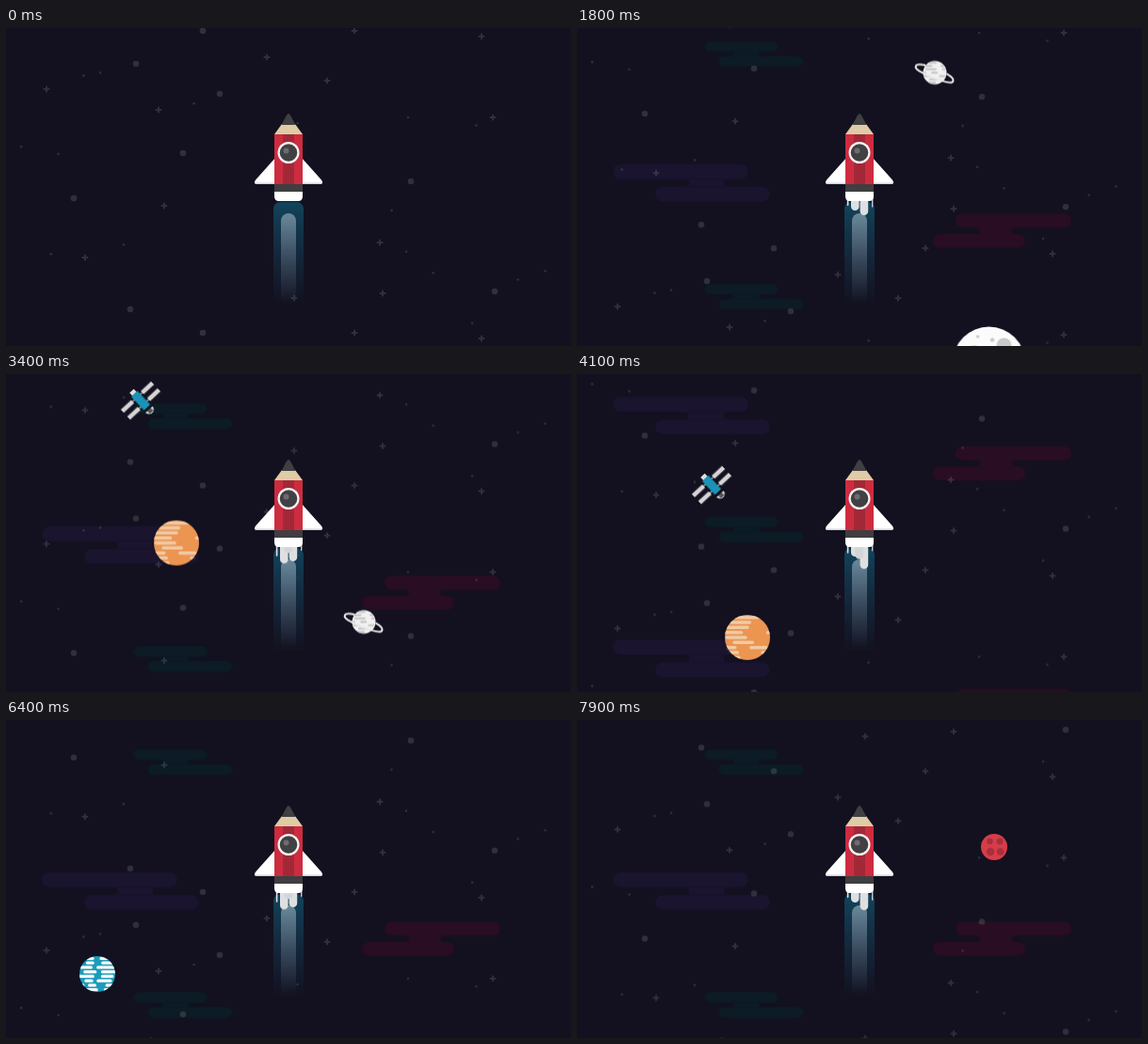
An HTML page that plays this animation: 600 px wide and 338 px high, repeating every 8 s.

```html
<!DOCTYPE html>
<html lang="en">
<head>
<meta charset="utf-8">
<title>Pencil rocket</title>
<style>
  html, body { margin: 0; width: 100%; height: 100%; overflow: hidden; background: #13111f; }
  svg { display: block; width: 100vw; height: 100vh; }

  /* Everything moves in 100 ms ticks over an 8 s loop; speeds are per second. */
  .fall { --x: 0px; --start: 0px; animation: fall 8s steps(80) infinite; }
  #clouds { --speed: 172px; }
  #stars { --speed: 128.4px; }
  #moon { --x: 437.5px; --start: -40px; --speed: 220px; }
  #ringed { --x: 380px; --start: -195.5px; --speed: 135px; }
  #orange { --x: 181px; --start: -308.7px; --speed: 143.6px; }
  #blue { --x: 97px; --start: -573.5px; --speed: 131.8px; }
  #red { --x: 443px; --start: -892px; --speed: 130px; }
  #satellite { animation: descend 8s steps(60) infinite; }
  #exhaust { animation: ignite 8s step-end infinite; }

  @keyframes fall {
    from { transform: translate(var(--x), var(--start)); }
    to { transform: translate(var(--x), calc(var(--start) + 8 * var(--speed))); }
  }
  /* Comes to rest with one panel tip at the lower edge. */
  @keyframes descend {
    0% { transform: translate(143px, -408px); }
    74.99% { transform: translate(143px, 361.8px); }
    75%, 100% { transform: translate(143px, 358px); }
  }
  @keyframes ignite {
    0% { visibility: hidden; }
    1.25%, 100% { visibility: visible; }
  }
</style>
</head>
<body>
<svg viewBox="0 0 600 338" preserveAspectRatio="none">
  <defs>
    <linearGradient id="outerFlame" x1="0" y1="0" x2="0" y2="1">
      <stop offset="0" stop-color="#12455d"/>
      <stop offset=".45" stop-color="#143a52" stop-opacity=".6"/>
      <stop offset=".95" stop-color="#143650" stop-opacity="0"/>
    </linearGradient>
    <linearGradient id="innerFlame" x1="0" y1="0" x2="0" y2="1">
      <stop offset="0" stop-color="#c3d3df" stop-opacity=".5"/>
      <stop offset=".5" stop-color="#b4c2d2" stop-opacity=".22"/>
      <stop offset=".95" stop-color="#aebfd0" stop-opacity="0"/>
    </linearGradient>
    <clipPath id="orangeDisc"><circle r="24"/></clipPath>
    <clipPath id="blueDisc"><circle r="19"/></clipPath>
    <clipPath id="ringedDisc"><circle r="12.5"/></clipPath>
  </defs>

  <rect width="600" height="338" fill="#13111f"/>
  <g id="clouds" class="fall"></g>
  <g id="stars" class="fall" fill="#fff" fill-opacity=".13"></g>

  <g id="moon" class="fall">
    <circle r="38.5" fill="#fbfbfb"/>
    <g fill="#c9c9c9">
      <circle cx="-15.5" cy="-12" r="6.8"/><circle cx="16" cy="-18.5" r="8"/>
      <circle cx="-9.5" cy="17.5" r="10.3"/><circle cx="19.5" cy="11.5" r="9.7"/>
      <circle cx="7" cy="-2" r="5"/><circle cx="28.5" cy="-4" r="3.2"/>
      <circle cx="-12" cy="-28" r="1.7"/><circle cx="3.5" cy="-24.5" r="2.2"/>
    </g>
  </g>

  <g id="ringed" class="fall">
    <circle r="12.5" fill="#f1f1f1"/>
    <g id="ringedBands" clip-path="url(#ringedDisc)" fill="#c9c9c9"></g>
    <path d="M-12-3.6C-24-2-25 4-12 5Q0 6.5 12 5C25 4 24-2 12-3.6"
          transform="rotate(22)" fill="none" stroke="#e9e9e9" stroke-width="2"/>
  </g>

  <g id="orange" class="fall">
    <circle r="24" fill="#eb9551"/>
    <g id="orangeBands" clip-path="url(#orangeDisc)" fill="#f1caa4"></g>
  </g>

  <g id="blue" class="fall">
    <circle r="19" fill="#1a9cba"/>
    <g id="blueBands" clip-path="url(#blueDisc)" fill="#f7fafb"></g>
  </g>

  <g id="red" class="fall">
    <circle r="14" fill="#d63d49"/>
    <g fill="#a92f3c">
      <circle cx="-4.5" cy="-6" r="3.2"/><circle cx="6" cy="-6" r="3.5"/>
      <circle cx="-4" cy="5" r="4.2"/><circle cx="6.5" cy="5" r="3.8"/>
    </g>
  </g>

  <g id="satellite">
    <g transform="rotate(47)">
      <path d="M-5-22V-7M5-22V-7M-5 7V22M5 7V22" stroke="#d6d4d6" stroke-width="4.6"/>
      <path d="M-5-7V7M5-7V7" stroke="#8d9499" stroke-width="1.6"/>
      <rect x="-14" y="-3" width="4" height="6" fill="#dedede"/>
      <rect x="-10" y="-4.500" width="20" height="9" rx="1" fill="#1a93b8"/>
      <path d="M10 0H13V-5A5 5 0 0 1 13 5V0Z" fill="#d9d9d6"/>
      <path d="M13-2.500H17V2.500H13Z" fill="#55555a"/>
    </g>
  </g>

  <!-- Flame and exhaust -->
  <rect x="284" y="185" width="32" height="117" rx="7" fill="url(#outerFlame)"/>
  <rect x="292" y="197" width="16" height="100" rx="8" fill="url(#innerFlame)"/>
  <g id="exhaust"></g>

  <!-- Rocket -->
  <path d="M286 138L265 161.500Q262 166 267 166H286ZM314 138L335 161.500Q338 166 333 166H314Z" fill="#fff"/>
  <path d="M265 165.200H286M314 165.200H335" stroke="#d3d3d5" stroke-width="1.600"/>
  <path d="M285 113L293 102H307L315 113Z" fill="#dfcca6"/>
  <path d="M292.500 103L297.500 93.500Q300 88.500 302.500 93.500L307.500 103Z" fill="#403f41"/>
  <rect x="285" y="113" width="30" height="53" fill="#cd2c40"/>
  <rect x="294" y="113" width="12" height="53" fill="#a22838"/>
  <rect x="285" y="166" width="30" height="8" fill="#3f3e40"/>
  <path d="M285 174H315V179Q315 184 310 184H290Q285 184 285 179Z" fill="#fff"/>
  <circle cx="300" cy="132.500" r="11.500" fill="#f4f4f4"/>
  <circle cx="300" cy="132.500" r="9.300" fill="#414043"/>
  <circle cx="297.500" cy="130.500" r="3" fill="#6d6c70"/>
</svg>

<script>
  const $ = id => document.getElementById(id);

  function seeded(seed) {
    return () => (seed = seed * 16807 % 2147483647) / 2147483647;
  }

  // Stacks copies of one tile upwards, plus one below.
  function tile(id, markup, pitch, above) {
    for (let k = -above; k <= 1; k++)
      $(id).innerHTML += `<g transform="translate(0 ${k * pitch})">${markup}</g>`;
  }

  const bar = (x, width, y, h) =>
    `<rect x="${x}" y="${y - h / 2}" width="${width}" height="${h}" rx="${h / 2}"/>`;

  // Two bars joined by a neck with scooped sides.
  function cloud({ color, x, y, h, gap, top, bottom, shift, neck }) {
    const r = gap / 2;
    return `<g fill="${color}" stroke="${color}" stroke-width=".6">
      ${bar(x, top, y, h)}${bar(x + shift, bottom, y + h + gap, h)}
      <path d="M${x + neck - r} ${y + h / 2}a${r} ${r} 0 0 1 0 ${gap}h${2.3 * h + gap}a${r} ${r} 0 0 1 0 ${-gap}Z"/></g>`;
  }
  const clouds = [
    { color: '#1a142e', x: 38, y: 101, h: 16, gap: 8, top: 144, bottom: 122, shift: 45, neck: 81 },
    { color: '#290e23', x: 402, y: 153, h: 14.5, gap: 7, top: 123, bottom: 98, shift: -24, neck: 26 },
    { color: '#0c1b25', x: 135.5, y: 226, h: 11.5, gap: 4.5, top: 78, bottom: 90, shift: 15, neck: 31 }
  ];
  // The lowest row waits just above the stage.
  const sky = clouds.map(cloud).join('');
  tile('clouds', `<g transform="translate(0 -516)">${sky}</g>`, 258, 5);

  // Stars: the larger ones are placed, the dust is scattered.
  const discs = [[138, 38], [227, 70], [188, 133], [72, 181], [132, 299], [430, 163], [519, 280], [209, 3]];
  const pluses = [[341, 56], [43, 65], [162, 87], [277, 31], [370, 3], [505, 9],
    [517, 95], [168, 189], [84, 244], [397, 228], [400, 282], [306, 287]];
  const rand = seeded(41);
  const dust = Array.from({ length: 16 }, () => [16 + 568 * rand(), 321 * rand()]);
  const dots = (points, r) => points.map(([x, y]) => `<circle cx="${x}" cy="${y}" r="${r}"/>`).join('');
  const crosses = pluses.map(([x, y]) =>
    `<path d="M${x - 3.3} ${y}h6.6M${x} ${y - 3.3}v2.3m0 2v2.3" stroke="#fff" stroke-opacity=".13" stroke-width="2"/>`);
  tile('stars', dots(discs, 3.3) + dots(dust, 1.3) + crosses.join(''), 321, 4);

  // Rows of rounded dashes with random lengths and gaps, in units of the radius.
  function bands(id, r, rows, gap, seed) {
    const rand = seeded(seed), pitch = 2 * r / rows;
    let out = '';
    for (let y = pitch / 2 - r; y < r; y += pitch) {
      let x = -r * (0.6 + rand());
      while (x < r) {
        const width = r * (0.4 + 0.8 * rand());
        out += bar(x, width, y, pitch * 0.65);
        x += width + r * gap * (0.5 + rand());
      }
    }
    $(id).innerHTML = out;
  }
  bands('orangeBands', 24, 9, 0.9, 7);
  bands('blueBands', 19, 8, 0.35, 23);
  bands('ringedBands', 12.5, 7, 0.7, 11);

  // Each column dips once a second: its lower edge is rest + dip * cos², around the peak.
  const columns = [
    { x: 286.8, width: 1.6, color: '#dfe4e8', rest: 189, dip: 9, peak: 0.28 },
    { x: 313, width: 1.4, color: '#c3ccd3', rest: 188, dip: 4, peak: 0.9 },
    { x: 291, width: 8.6, color: '#dedfe1', rest: 194, dip: 9, peak: 0.47 },
    { x: 300.6, width: 8.6, color: '#dedfe1', rest: 199, dip: 9, peak: 0.05 },
    { x: 295.4, width: 8.8, color: '#d3d5d8', rest: 184, dip: 27, peak: 0.23 }
  ];
  const ticks = Array.from({ length: 11 }, (_, i) => i / 10);
  for (const { x, width, color, rest, dip, peak } of columns) {
    const el = document.createElementNS('http://www.w3.org/2000/svg', 'rect');
    const attrs = { x, y: -36, width, height: 36, rx: width / 2, fill: color };
    for (const name in attrs) el.setAttribute(name, attrs[name]);
    $('exhaust').append(el);
    const edge = t => rest + dip * Math.max(0, Math.cos(2 * Math.PI * (t - peak))) ** 2;
    el.animate(
      ticks.map(t => ({ transform: `translateY(${edge(t)}px)`, easing: 'step-end' })),
      { duration: 1000, iterations: Infinity }
    );
  }
</script>
</body>
</html>
```
